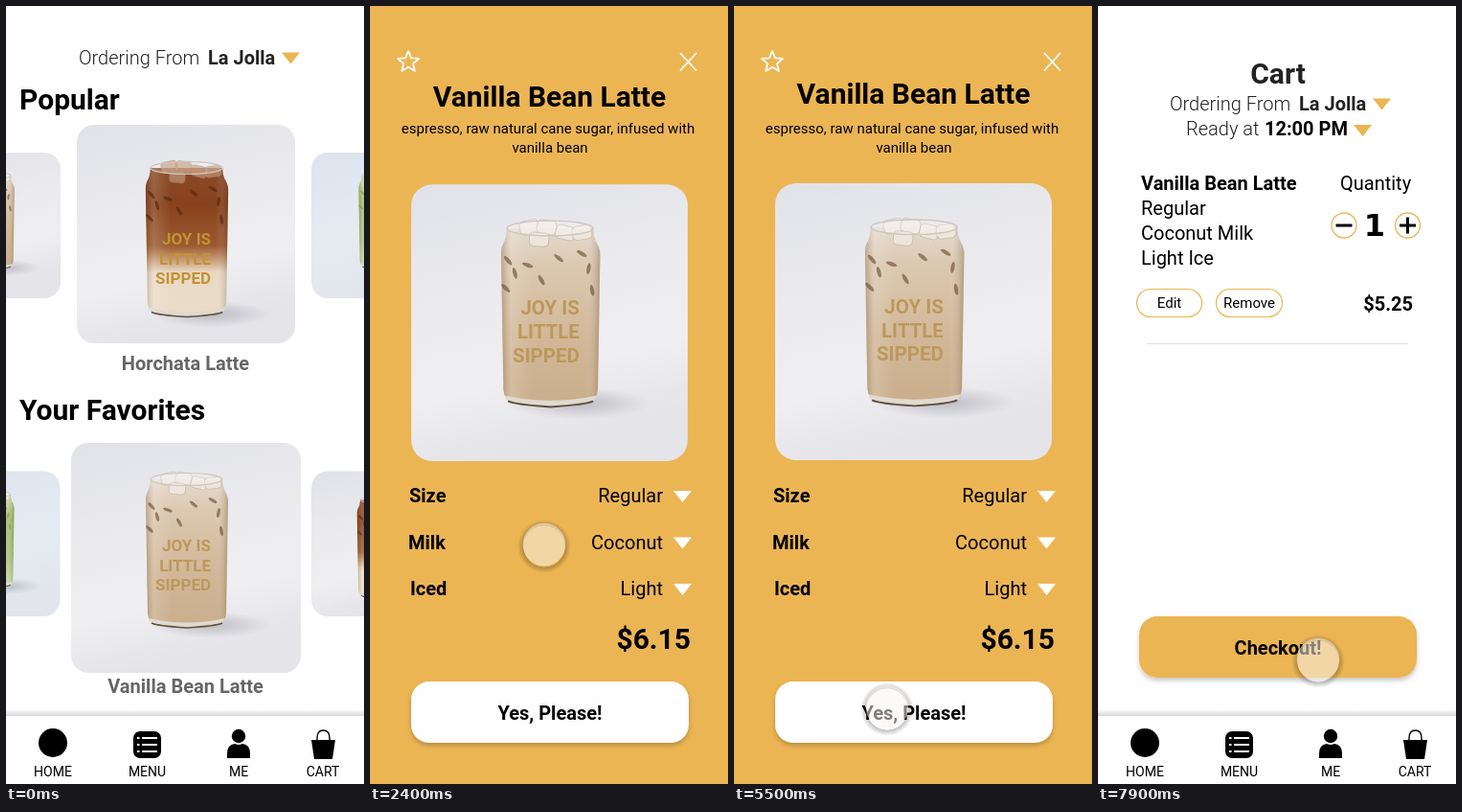
Animation, 374 px wide and 812 px high, one loop 8000 ms. Source, as an HTML page:

```html
<!DOCTYPE html>
<html lang="en">
<head>
<meta charset="utf-8">
<title>Drink ordering flow</title>
<style>
  html, body { margin: 0; width: 100%; height: 100%; overflow: hidden; background: #fff; }
  svg { display: block; width: 374px; height: 812px; }
  text { font-family: Roboto, "Liberation Sans", sans-serif; white-space: pre; }
</style>
</head>
<body>
<svg id="stage" viewBox="0 0 374 812" xmlns="http://www.w3.org/2000/svg">
  <defs>
    <linearGradient id="wall" x2="0.25" y2="1">
      <stop offset="0" stop-color="#e1e2e8"/><stop offset=".45" stop-color="#ebebee"/>
      <stop offset=".75" stop-color="#efeff1"/><stop offset="1" stop-color="#e4e4e9"/>
    </linearGradient>
    <linearGradient id="coolWall" x2="0.25" y2="1">
      <stop offset="0" stop-color="#dde4ef"/><stop offset=".6" stop-color="#e6ebf2"/>
      <stop offset="1" stop-color="#e2e5ec"/>
    </linearGradient>
    <linearGradient id="vanilla" x2="0" y2="1">
      <stop offset="0" stop-color="#e4dace"/><stop offset=".2" stop-color="#dcc9b2"/>
      <stop offset=".6" stop-color="#d2b898"/><stop offset="1" stop-color="#c9ae8c"/>
    </linearGradient>
    <linearGradient id="horchata" x2="0" y2="1">
      <stop offset="0" stop-color="#8a4a28"/><stop offset=".25" stop-color="#87421d"/>
      <stop offset=".52" stop-color="#9c5a30"/><stop offset=".62" stop-color="#c99f79"/>
      <stop offset=".7" stop-color="#e9dac5"/><stop offset="1" stop-color="#eadcc9"/>
    </linearGradient>
    <linearGradient id="matcha" x2="0" y2="1">
      <stop offset="0" stop-color="#d5dfb8"/><stop offset=".25" stop-color="#a9c277"/>
      <stop offset=".7" stop-color="#b3c988"/><stop offset="1" stop-color="#d3deba"/>
    </linearGradient>
    <linearGradient id="sheen">
      <stop offset="0" stop-color="#4a2c10" stop-opacity=".25"/><stop offset=".1" stop-color="#fff" stop-opacity=".15"/>
      <stop offset=".3" stop-color="#fff" stop-opacity="0"/><stop offset=".85" stop-color="#fff" stop-opacity="0"/>
      <stop offset="1" stop-color="#4a2c10" stop-opacity=".28"/>
    </linearGradient>
    <radialGradient id="floor">
      <stop offset="0" stop-color="#86868f" stop-opacity=".45"/><stop offset="1" stop-color="#86868f" stop-opacity="0"/>
    </radialGradient>
    <linearGradient id="navShade" x2="0" y2="1">
      <stop offset="0" stop-opacity="0"/><stop offset="1" stop-opacity=".16"/>
    </linearGradient>
    <radialGradient id="halo">
      <stop offset=".76" stop-opacity="0"/><stop offset=".78" stop-opacity=".24"/><stop offset="1" stop-opacity="0"/>
    </radialGradient>
    <filter id="lift" x="-10%" y="-20%" width="120%" height="150%">
      <feDropShadow dx="0" dy="3" stdDeviation="2.5" flood-opacity=".22"/>
    </filter>
  </defs>
</svg>
<script>
const GOLD = '#ecb553';
const LOOP = 8000;
const GLASS = 'M83 38Q83 46 79 53Q78 56 78 61L80 178Q81 188 88 190Q121 197 154 190Q161 188 162 178' +
              'L164 61Q164 55 160 49Q158 44 158 38Z';
const stage = document.getElementById('stage');

const text = (x, y, str, size = 20, weight = 400, anchor = 'start', fill = '#000') =>
  `<text x="${x}" y="${y}" font-size="${size}" font-weight="${weight}" text-anchor="${anchor}" fill="${fill}">${str}</text>`;
const bold = (x, y, str, size = 20, anchor, fill) => text(x, y, str, size, 700, anchor, fill);
const triangle = (x, y, fill) => `<path d="M${x} ${y}h19l-9.5 12z" fill="${fill}"/>`;
const box = (x, y, w, h, r, attrs) => `<rect x="${x}" y="${y}" width="${w}" height="${h}" rx="${r}" ${attrs}/>`;
const stroke = (d, color, width) => `<path d="${d}" fill="none" stroke="${color}" stroke-width="${width}"/>`;

const DRINKS = {
  vanilla:  { wall: 'wall', fleck: '#6e5034', ice: '#f3eee8', print: '#bd985c', fit: '' },
  horchata: { wall: 'wall', fleck: '#57260f', ice: '#c09274', print: '#c39235', fit: 'translate(-6.7 7.2) scale(1.056)' },
  matcha:   { wall: 'coolWall', fleck: '#7f9a4c', ice: '#eef2dd', print: '#b7a552', fit: '' }
};

function drink(kind) {
  const { fleck, ice, print, fit } = DRINKS[kind];
  const cubes = [[93, 33, -12], [110, 30, 8], [127, 34, 14], [139, 37, -8], [103, 41, 5]]
    .map(([x, y, turn]) => box(x, y, 17, 12, 4, `transform="rotate(${turn} ${x} ${y})" fill="${ice}" opacity=".7" stroke="#8a7058" stroke-opacity=".4" stroke-width=".8"`)).join('');
  const flecks = [[84, 66, 50], [90, 77, 75], [101, 70, 20], [113, 83, 60], [128, 64, 40], [82, 90, 45], [154, 73, 100], [148, 60, 30], [157, 92, 80]]
    .map(([x, y, turn]) => `<ellipse cx="${x}" cy="${y}" rx="5" ry="1.7" transform="rotate(${turn} ${x} ${y})" fill="${fleck}" opacity=".65"/>`).join('');
  const drop = kind === 'horchata' ? 5 : 0;
  const slogan = ['JOY IS', 'LITTLE', 'SIPPED']
    .map((word, i) => bold(146, 113 + drop + i * 20.5, word, 17, 'end', print)).join('');
  return `<g transform="${fit}">
    <ellipse cx="146" cy="190" rx="62" ry="14" fill="url(#floor)"/>
    <path d="${GLASS}" fill="url(#${kind})"/>
    <path d="${GLASS}" fill="url(#sheen)"/>
    <path d="M81 183Q121 192 161 183Q160 188 154 190Q121 197 88 190Q82 188 81 183Z" fill="#e2d9cf"/>
    ${stroke('M84 188Q90 191 121 193Q152 191 158 188', '#5f5243', 1.6)}
    ${cubes}${flecks}
    <ellipse cx="120.5" cy="38" rx="37.5" ry="6.5" fill="#fff" fill-opacity=".16" stroke="#cfc6bd" stroke-width="1.2"/>
    ${slogan}</g>`;
}

function photo(x, y, size, kind, radius) {
  const k = size / 240;
  return `<g transform="translate(${x} ${y}) scale(${k})">` +
    box(0, 0, 240, 240, radius / k, `fill="url(#${DRINKS[kind].wall})"`) + drink(kind) + '</g>';
}

const place = (x, y) =>
  text(x, y, 'Ordering From', 20, 300, 'start', '#222') + bold(x + 135, y, 'La Jolla', 20, 'start', '#222') +
  triangle(x + 212, y - 12.5, GOLD);

const nav = () =>
  box(0, 734, 374, 7, 0, 'fill="url(#navShade)"') + box(0, 741, 374, 71, 0, 'fill="#fff"') +
  '<circle cx="49" cy="769" r="15"/>' +
  box(133, 757, 29, 28, 7, '') +
  [764, 771, 778].map(y => stroke(`M137 ${y}h2.5M142 ${y}h16`, '#fff', 2.2)).join('') +
  '<circle cx="243" cy="762" r="7.2"/><path d="M231 785v-5q0-9 8-10q4 2 8 0q8 1 8 10v5z"/>' +
  '<path d="M319 766h25l-3 20h-19z"/>' + stroke('M325 769v-5q0-8 6.500-8t6.500 8v5', '#000', 1.4) +
  [[49, 'HOME'], [147.5, 'MENU'], [243, 'ME'], [331, 'CART']]
    .map(([x, label]) => text(x, 804, label, 14, 400, 'middle')).join('');

const home = () =>
  place(76, 61) + bold(14, 108, 'Popular', 30) +
  photo(-95, 153, 152, 'vanilla', 17) + photo(74, 124, 228, 'horchata', 18) + photo(319, 153, 152, 'matcha', 17) +
  bold(187.5, 380, 'Horchata Latte', 20, 'middle', '#666') +
  bold(14, 432, 'Your Favorites', 30) +
  photo(-95, 485.5, 151.500, 'matcha', 17) + photo(319, 485.5, 151.500, 'horchata', 17) + nav();

function detail() {
  const star = Array.from({ length: 10 }, (_, i) => {
    const r = i % 2 ? 5.2 : 11.5, a = i * Math.PI / 5;
    return `${40 + r * Math.sin(a)},${58.5 - r * Math.cos(a)}`;
  }).join(' ');
  const options = [[41, 'Size', 'Regular'], [40, 'Milk', 'Coconut'], [42, 'Iced', 'Light']]
    .map(([x, name, value], i) => {
      const y = 518 + i * 48.5;
      return bold(x, y, name) + text(306, y, value, 20, 400, 'end') + triangle(317, y - 12, '#fff');
    }).join('');
  return `<polygon points="${star}" fill="none" stroke="#fff" stroke-width="1.8" stroke-linejoin="round"/>` +
    stroke('M324 49l17 18.500M341 49l-17 18.500', '#fff', 1.8) +
    text(186, 133, 'espresso, raw natural cane sugar, infused with', 15, 400, 'middle') +
    text(188, 153, 'vanilla bean', 15, 400, 'middle') + options +
    bold(335, 671, '$6.15', 30, 'end') +
    box(43, 705, 290, 64, 19, 'fill="#fff" filter="url(#lift)"') +
    bold(188, 745, 'Yes, Please!', 20, 'middle');
}

function cart() {
  const ring = x => `<circle cx="${x}" cy="229" r="13" fill="#fff" stroke="${GOLD}" stroke-width="1.3"/>`;
  const pill = (x, w, label) =>
    box(x, 295.5, w, 29, 14.5, `fill="#fff" stroke="${GOLD}" stroke-width="1.2"`) +
    text(x + w / 2, 315, label, 15, 400, 'middle');
  return box(0, 0, 374, 812, 0, 'fill="#fff"') +
    bold(188, 81, 'Cart', 30, 'middle', '#222') + place(75, 109) +
    text(92, 135, 'Ready at', 20, 300, 'start', '#222') + bold(174, 135, '12:00 PM') + triangle(267, 124, GOLD) +
    bold(45, 192, 'Vanilla Bean Latte') +
    ['Regular', 'Coconut Milk', 'Light Ice'].map((line, i) => text(45, 218 + i * 26, line)).join('') +
    text(253, 192, 'Quantity') +
    ring(257) + stroke('M248.500 229h17', '#000', 3) +
    ring(323.5) + stroke('M315 229h17M323.500 220.500v17', '#000', 3) +
    '<text x="289" y="240" font-size="32" font-weight="700" text-anchor="middle" style="font-family:\'DejaVu Sans\',sans-serif">1</text>' +
    pill(40.5, 68, 'Edit') + pill(123.5, 69, 'Remove') + bold(329, 318, '$5.25', 20, 'end') +
    stroke('M51 352.500H324', '#e0e0e0', 1.2) +
    box(43, 637, 290, 64, 19, `fill="${GOLD}" filter="url(#lift)"`) +
    bold(188, 677, 'Checkout!', 20, 'middle') + nav();
}

stage.insertAdjacentHTML('beforeend', `
  <rect width="374" height="812" fill="#fff"/>
  <rect id="backdrop" width="374" height="812" fill="${GOLD}"/>
  <g id="hero">${photo(0, 0, 240, 'vanilla', 18)}</g>
  <g id="detail">${detail()}</g>
  <g id="home">${home()}</g>
  <g id="title">${bold(0, 0, 'Vanilla Bean Latte', 20, 'middle', 'currentColor')}</g>
  <g id="cart">${cart()}</g>
  <g id="cursor">
    <circle cy="2" r="28" fill="url(#halo)"/>
    <circle r="22" fill="#f9f5f0" fill-opacity=".52" stroke="#fff" stroke-opacity=".25"/>
  </g>`);

const part = Object.fromEntries(['backdrop', 'hero', 'detail', 'home', 'title', 'cart', 'cursor']
  .map(id => [id, document.getElementById(id)]));

// Pointer stops: time, x, y
const PATH = [
  [650, 402, 600], [1150, 202, 557], [1250, 202, 557], [1900, 182, 562], [2400, 182, 562], [3300, 269, 528],
  [3700, 320, 520], [4100, 326, 585], [4500, 306, 649], [5400, 160, 732], [7300, 158, 732], [7900, 230, 682], [8000, 230, 682]
];

const clamp = v => Math.min(1, Math.max(0, v));
const mix = (a, b, p) => a + (b - a) * p;
const easeOut = (t, start, length) => 1 - (1 - clamp((t - start) / length)) ** 2;

function fade(node, opacity) {
  node.style.display = opacity > 0 ? '' : 'none';
  node.setAttribute('opacity', opacity);
}

function pointerAt(t) {
  const i = PATH.findIndex(stop => stop[0] > t);
  if (i < 1) return PATH[0].slice(1);
  const [from, to] = [PATH[i - 1], PATH[i]];
  const u = (t - from[0]) / (to[0] - from[0]);
  const p = u * u * (3 - 2 * u);
  return [mix(from[1], to[1], p), mix(from[2], to[2], p)];
}

function render(t) {
  const open = easeOut(t, 2028, 400);
  fade(part.backdrop, clamp((open - 0.34) / 0.66));
  fade(part.detail, open);
  fade(part.home, clamp(1 - 2 * open * open));
  part.hero.setAttribute('transform',
    `translate(${mix(68, 43, open)} ${mix(456, 185, open)}) scale(${mix(240, 289, open) / 240})`);
  part.title.setAttribute('transform',
    `translate(187.500 ${mix(717, 102, open)}) scale(${mix(1, 1.5, open)})`);
  const tone = Math.round(102 * (1 - clamp(open * 3)));
  part.title.style.color = `rgb(${tone},${tone},${tone})`;
  fade(part.cart, easeOut(t, 6271, 400));
  part.cursor.setAttribute('transform', `translate(${pointerAt(t)})`);
}

const began = performance.now();
function tick() {
  render((performance.now() - began) % LOOP);
  requestAnimationFrame(tick);
}
render(0);
requestAnimationFrame(tick);
</script>
</body>
</html>
```
